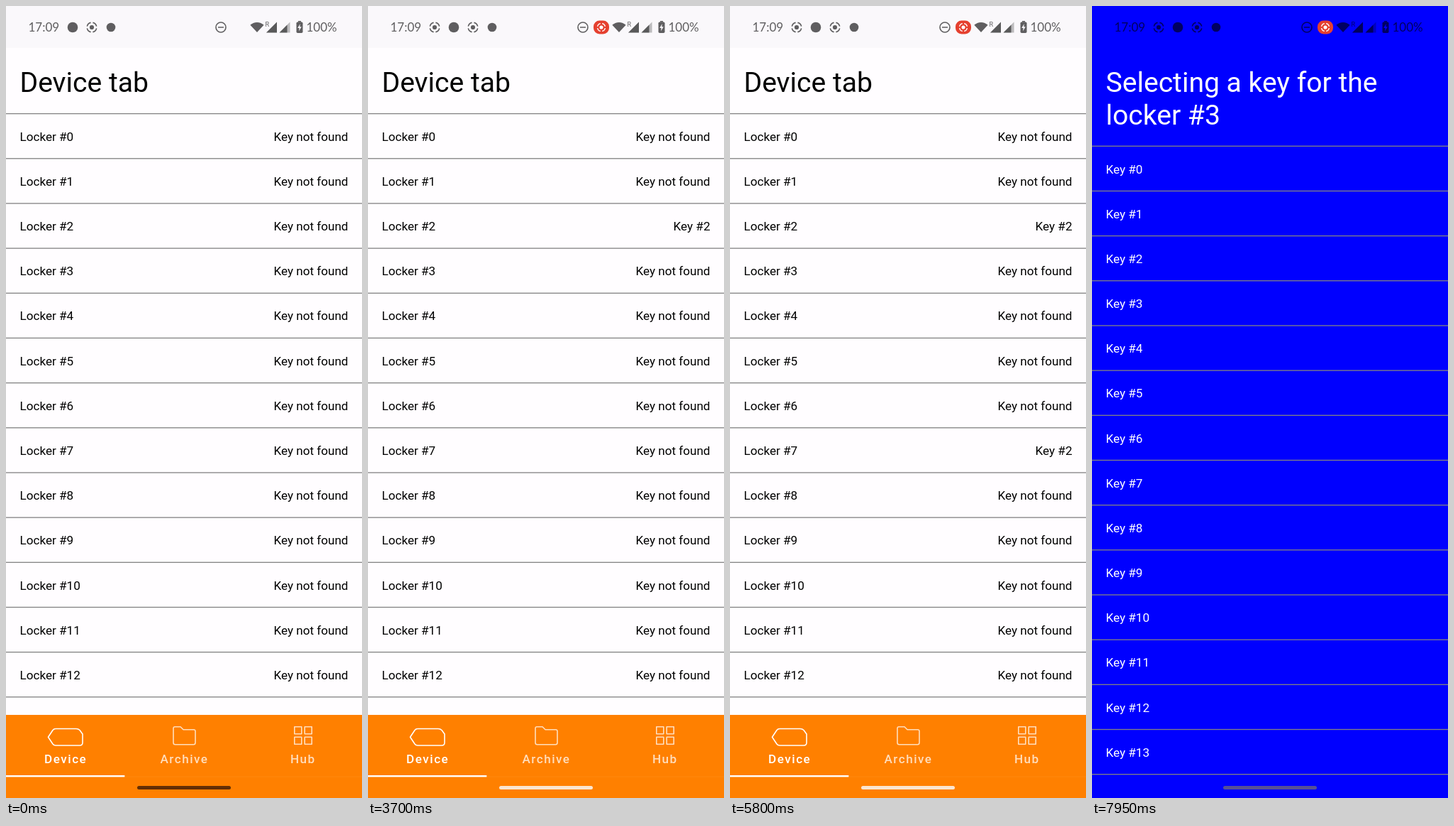
Write an HTML page with a canvas that moves like this. It is 502x1115 px and loops after 8000 ms.

```html
<!DOCTYPE html>
<html lang="en">
<head>
<meta charset="utf-8">
<title>Lockers</title>
<style>
html, body { margin: 0; width: 100%; height: 100%; overflow: hidden; background: #fffdff; }
canvas { display: block; width: 502px; height: 1115px; }
</style>
</head>
<body>
<canvas id="stage" width="502" height="1115"></canvas>
<script>
const W = 502, H = 1115, LOOP = 8000;
const ROW = 63.17, MARGIN = 19.5, TAB = W / 3;
const BLUE = '#0000ff', ORANGE = '#ff8000', INK = 'rgba(0,0,0,.62)';
const ctx = document.getElementById('stage').getContext('2d');

// Screens in order; each one replaces the previous at once.
const screens = [
  { at: 0, tab: 0, keys: {} },
  { at: 2025, locker: 2 },
  { at: 3575, tab: 0, keys: { 2: 2 } },
  { at: 4725, locker: 7 },
  { at: 5625, tab: 0, keys: { 2: 2, 7: 2 } },
  { at: 6775, tab: 1, keys: {} },
  { at: 7775, locker: 3 }
];

const taps = [
  { down: 1740, up: 1850, x: 306, y: 313 },
  { down: 3240, up: 3340, x: 258, y: 356 },
  { down: 4370, up: 4475, x: 318, y: 622 },
  { down: 5270, up: 5365, x: 258, y: 356 },
  { down: 6540, up: 6650, x: 263.5, y: 1051 },
  { down: 7500, up: 7600, x: 300, y: 374 }
];

// Gesture handle colours, each reached 200 ms after its start.
const handles = [
  { at: -200, c: [45, 18, 8, .74] },
  { at: 2325, c: [250, 250, 250, .83] },
  { at: 3875, c: [125, 115, 105, .7] },
  { at: 5025, c: [250, 250, 250, .83] },
  { at: 5925, c: [125, 115, 105, .7] },
  { at: 8000, c: [250, 250, 250, .83] }
];

const clamp = v => Math.max(0, Math.min(1, v));
const span = (t, from, length) => clamp((t - from) / length);
const ease = p => p * p * (3 - 2 * p);
const mix = (a, b, p) => a + (b - a) * p;

function text(s, x, y, font, color, align = 'left') {
  ctx.font = font;
  ctx.fillStyle = color;
  ctx.textAlign = align;
  ctx.fillText(s, x, y);
}

function rect(x, y, w, h, color) {
  ctx.fillStyle = color;
  ctx.fillRect(x, y, w, h);
}

function disc(x, y, r, color) {
  ctx.fillStyle = color;
  ctx.beginPath();
  ctx.arc(x, y, r, 0, 7);
  ctx.fill();
}

function pill(x, y, w, h, r, color) {
  ctx.fillStyle = color;
  ctx.beginPath();
  ctx.roundRect(x, y, w, h, r);
  ctx.fill();
}

function poly(points, color) {
  ctx.fillStyle = color;
  ctx.beginPath();
  points.forEach(([x, y]) => ctx.lineTo(x, y));
  ctx.closePath();
  ctx.fill();
}

const title = (s, line, color) =>
  text(s, MARGIN, 120.7 + line * 45.8, '39.1px Roboto, sans-serif', color);

function list(top, count, color, label, value) {
  const font = '17.1px Roboto, sans-serif';
  for (let i = 0; i <= count; i++) {
    const y = top + i * ROW;
    rect(0, y - .65, W, 1.3, '#828282');
    if (i === count) break;
    text(label(i), MARGIN, y + 38.2, font, color);
    if (value) text(value(i), W - MARGIN, y + 38.2, font, color, 'right');
  }
}

function recordIcon(x, y, color, size = 1) {
  disc(x, y, 3.1 * size, color);
  ctx.strokeStyle = color;
  ctx.lineWidth = 1.6 * size;
  for (let i = 0; i < 4; i++) {
    const a = i * Math.PI / 2 + Math.PI / 4;
    ctx.beginPath();
    ctx.arc(x, y, 6.8 * size, a - .58, a + .58);
    ctx.stroke();
  }
}

function wifi(x, y) {
  ctx.fillStyle = INK;
  ctx.beginPath();
  ctx.moveTo(x, y);
  ctx.arc(x, y, 14, -Math.PI * .74, -Math.PI * .26);
  ctx.closePath();
  ctx.fill();
}

function signal(x, cut) {
  poly([[x, 37.5], [x + 15, 22.5], [x + 15, 37.5]], 'rgba(0,0,0,.25)');
  poly([[x, 37.5], [x + cut, 37.5 - cut], [x + cut, 37.5]], 'rgba(0,0,0,.52)');
}

function statusBar(t, background) {
  const shift = 27 * ease(span(t, 100, 400));
  const font = '17px Lato, sans-serif';
  text('17:09', 31.5, 36, font, INK);
  if (shift > 0) {
    ctx.globalAlpha = shift / 27;
    recordIcon(94, 30, INK);
    ctx.globalAlpha = 1;
  }
  disc(94 + shift, 30, 7.3, INK);
  recordIcon(121 + shift, 30, INK);
  disc(148 + shift, 30, 6.3, INK);

  ctx.strokeStyle = INK;
  ctx.lineWidth = 1.6;
  ctx.beginPath();
  ctx.arc(303, 30, 7, 0, 7);
  ctx.moveTo(299, 30);
  ctx.lineTo(307, 30);
  ctx.stroke();

  const grow = ease(span(t, 120, 300));
  if (grow > 0) {
    ctx.save();
    ctx.translate(329, 30);
    ctx.scale(grow, grow);
    pill(-11, -9.5, 22, 19, 8.5, '#e5402f');
    recordIcon(0, 0, '#fff', .82);
    ctx.restore();
  }

  wifi(354, 37);
  text('R', 365.5, 28.5, '9px Roboto, sans-serif', INK);
  signal(367, 15);
  signal(385.5, 11);
  pill(409.5, 22.5, 9, 15.5, 1.8, INK);
  rect(412, 21, 4, 1.5, INK);
  poly([[414.8, 25], [411.2, 31], [413.6, 31], [413, 35.5], [416.7, 29.3], [414.3, 29.3]], background);
  text('100%', 423.5, 36, font, INK);
}

function tabIcons(tones) {
  ctx.lineWidth = 1.6;
  ctx.lineJoin = 'round';

  ctx.strokeStyle = tones[0];
  ctx.beginPath();
  ctx.moveTo(70, 1017.5);
  ctx.lineTo(99, 1017.5);
  ctx.quadraticCurveTo(102, 1017.5, 104, 1019.5);
  ctx.lineTo(108, 1025);
  ctx.lineTo(108, 1037);
  ctx.quadraticCurveTo(108, 1041, 104, 1041);
  ctx.lineTo(70, 1041);
  ctx.quadraticCurveTo(67.5, 1041, 66, 1039);
  ctx.lineTo(59.5, 1029.3);
  ctx.lineTo(66, 1019.5);
  ctx.quadraticCurveTo(67.5, 1017.5, 70, 1017.5);
  ctx.stroke();

  ctx.strokeStyle = tones[1];
  ctx.beginPath();
  ctx.moveTo(236, 1021);
  ctx.lineTo(236, 1017);
  ctx.quadraticCurveTo(236, 1014.8, 238.2, 1014.8);
  ctx.lineTo(246, 1014.8);
  ctx.lineTo(250, 1018.8);
  ctx.lineTo(264.5, 1018.8);
  ctx.quadraticCurveTo(267, 1018.8, 267, 1021);
  ctx.lineTo(267, 1037);
  ctx.quadraticCurveTo(267, 1039.8, 264.5, 1039.8);
  ctx.lineTo(238.5, 1039.8);
  ctx.quadraticCurveTo(236, 1039.8, 236, 1037);
  ctx.closePath();
  ctx.stroke();

  ctx.strokeStyle = tones[2];
  for (const x of [406.8, 421.2])
    for (const y of [1014.8, 1029.2]) ctx.strokeRect(x, y, 10, 10);
}

function tabBar(t, tab) {
  const slide = tab ? ease(span(t, 6825, 250)) : 0;
  const blend = tab ? span(t, 6825, 150) : 0;
  const tones = [1 - blend, blend, 0].map(p => `rgba(255,255,255,${mix(.74, 1, p)})`);
  rect(0, 998, W, H - 998, ORANGE);
  rect(0, 1084.5, W, 1, 'rgba(255,255,255,.06)');
  rect(slide * TAB, 1083, TAB, 2.4, '#fff');
  tabIcons(tones);
  ctx.letterSpacing = '1.5px';
  ['Device', 'Archive', 'Hub'].forEach((name, i) =>
    text(name, TAB * (i + .5) + .5, 1066.3, '500 17.1px Roboto, sans-serif', tones[i], 'center'));
  ctx.letterSpacing = '0px';
}

function tabScreen(t, { tab, keys }) {
  rect(0, 0, W, H, '#fffdff');
  rect(0, 0, W, 59, '#faf8fb');
  title(['Device tab', 'Archive tab'][tab], 0, '#000');
  list(151.6, 13, '#000', i => 'Locker #' + i,
    i => i in keys ? 'Key #' + keys[i] : 'Key not found');
  tabBar(t, tab);
}

function keyScreen({ locker }) {
  rect(0, 0, W, H, BLUE);
  title('Selecting a key for the', 0, '#fff');
  title('locker #' + locker, 1, '#fff');
  list(197.3, 14, '#fff', i => 'Key #' + i);
}

function handle(t) {
  const i = handles.findLastIndex(h => h.at <= t);
  const from = handles[Math.max(0, i - 1)].c, p = span(t, handles[i].at, 200);
  const color = handles[i].c.map((v, k) => mix(from[k], v, p));
  pill(185, 1098, 132, 5, 2.5, `rgba(${color.join()})`);
}

function touches(t) {
  for (const { down, up, x, y } of taps) {
    const alpha = 1 - span(t, up, 200);
    if (t < down || alpha <= 0) continue;
    ctx.globalAlpha = alpha;
    disc(x, y, 11, 'rgba(238,238,244,.5)');
    ctx.strokeStyle = 'rgba(150,140,205,.45)';
    ctx.lineWidth = 1.5;
    ctx.beginPath();
    ctx.arc(x, y, 10.4, 0, 7);
    ctx.stroke();
    ctx.globalAlpha = 1;
  }
}

function draw(t) {
  const screen = screens.findLast(s => s.at <= t);
  const picking = 'locker' in screen;
  if (picking) keyScreen(screen);
  else tabScreen(t, screen);
  statusBar(t, picking ? BLUE : '#faf8fb');
  handle(t);
  touches(t);
}

const start = performance.now();
function tick() {
  draw((performance.now() - start) % LOOP);
  requestAnimationFrame(tick);
}
tick();
</script>
</body>
</html>
```
